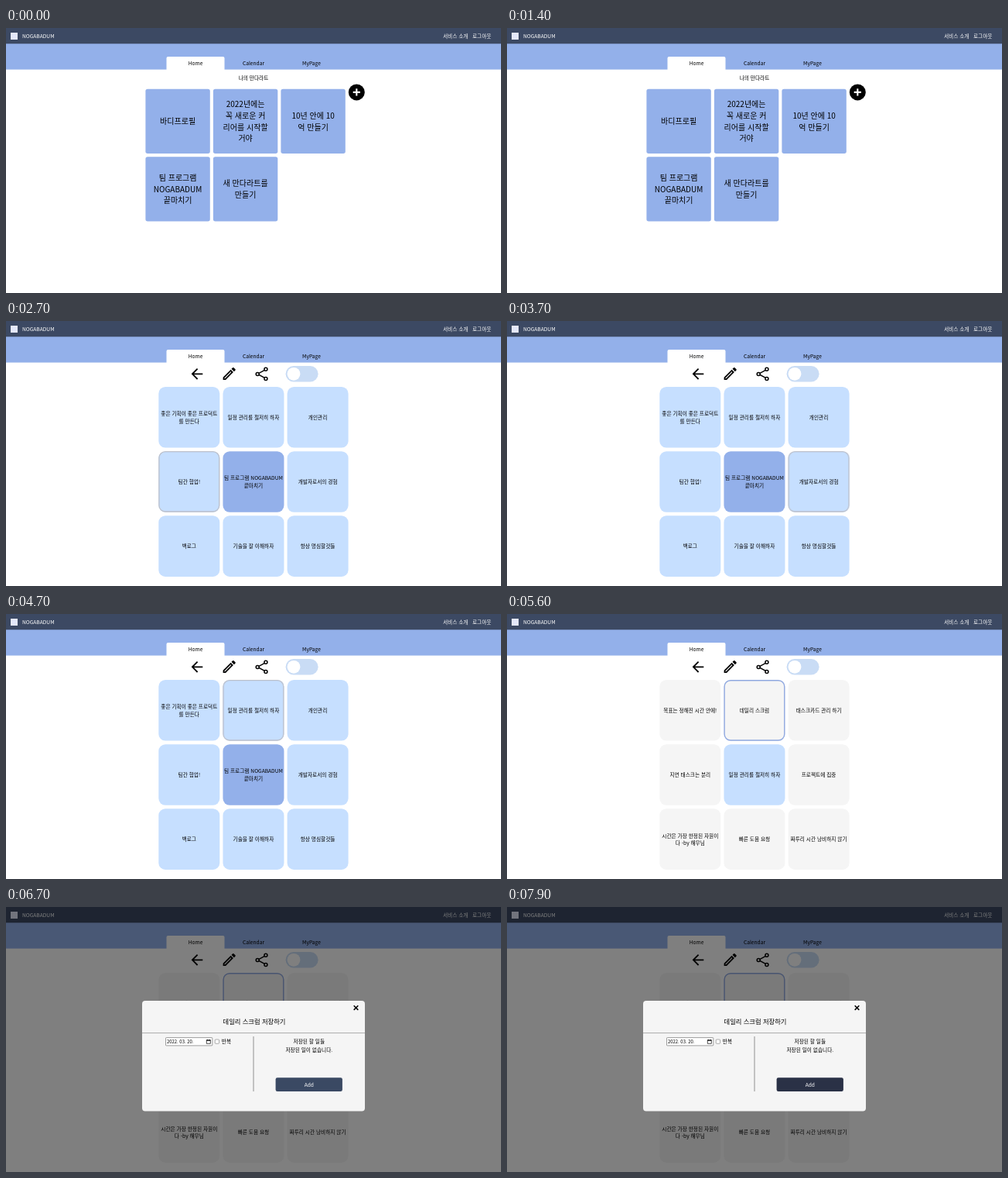
Recreate the animation shown at these times as an HTML page. Size 640 px wide and 342 px high, loop 8 s.

```html
<!DOCTYPE html>
<html lang="ko">
<head>
<meta charset="utf-8">
<title>Goal board</title>
<style>
html, body { margin: 0; width: 100%; height: 100%; overflow: hidden; background: #fff; }
svg { display: block; width: 100vw; height: 100vh; }
text { font-family: "Noto Sans CJK KR", "Noto Sans CJK", "Noto Sans", sans-serif; font-size: 6.667px; }
.mid { text-anchor: middle; }
.light { fill: #fff; }
.big text { font-size: 10px; }
.title { font-size: 8.3px; }
.line { fill: none; stroke: #000; }

.timed { animation: 8s step-end infinite; }
#home { animation-name: home; }
#grid { animation-name: grid; }
#sub { animation-name: sub; }
#subRing { animation-name: subRing; }
#modal { animation-name: modal; }
#loading { animation-name: loading; }
#loaded { animation-name: loaded; }
#close { animation-name: close; }
#ring { animation-name: ring; }
#add { fill: #3a4963; animation: add 8s linear infinite; }
.grow { transform-box: fill-box; transform-origin: center; animation: grow 8s linear infinite; }
#spin { transform-origin: 394.3px 190.5px; animation: spin 1s -.3s linear infinite; }

@keyframes home { 0% { opacity: 1 } 31%, to { opacity: 0 } }
@keyframes grid { 0% { opacity: 0 } 31% { opacity: 1 } 67.25%, to { opacity: 0 } }
@keyframes sub { 0% { opacity: 0 } 67.25%, to { opacity: 1 } }
@keyframes subRing { 0% { opacity: 0 } 68.5%, to { opacity: 1 } }
@keyframes modal { 0% { opacity: 0 } 71%, to { opacity: 1 } }
@keyframes loading { 0% { opacity: 1 } 77.25%, to { opacity: 0 } }
@keyframes loaded { 0% { opacity: 0 } 77.25%, to { opacity: 1 } }
@keyframes close { 0% { opacity: 0 } 27.25%, to { opacity: 1 } }
@keyframes grow { 0%, 27.25% { transform: none } 29%, to { transform: scale(1.012) } }
@keyframes add { 0%, 94.75% { fill: #3a4963 } 97%, to { fill: #2a3146 } }
@keyframes spin { to { transform: rotate(360deg) } }
/* the highlight follows the pointer from cell to cell */
@keyframes ring {
  0% { transform: translate(0, 83px) }
  41% { transform: translate(83.1px, 83px) }
  44.75% { transform: translate(166.3px, 83px) }
  51% { transform: translate(166.3px, 166.2px) }
  53.5% { transform: translate(166.3px, 83px) }
  55% { transform: translate(166.3px, 0) }
  56.25%, to { transform: translate(83.1px, 0) }
}
</style>
</head>
<body>
<svg viewBox="0 0 640 342" preserveAspectRatio="none">
  <rect width="640" height="342" fill="#fff"/>
  <rect y="20" width="640" height="33.6" fill="#93b0ea"/>
  <rect width="640" height="20.3" fill="#3c4963"/>
  <rect x="6" y="6" width="9" height="9" fill="#e4e8fa"/>
  <text class="light" x="21" y="12.9">NOGABADUM</text>
  <text class="light" x="565" y="12.9">서비스 소개</text>
  <text class="light" x="603" y="12.9">로그아웃</text>
  <path d="M207.5 54V39q0-2 2-2h71q2 0 2 2v15z" fill="#fff"/>
  <g class="mid">
    <text x="245" y="48.2">Home</text>
    <text x="320" y="48.2">Calendar</text>
    <text x="395" y="48.2">MyPage</text>
  </g>

  <g id="home" class="timed">
    <text class="mid" x="320" y="67">나의 만다라트</text>
    <g id="boards" class="big mid"></g>
    <path id="close" class="line timed" stroke-width="1.2" d="M257.6 167.5l4.8 4.8m0-4.8l-4.8 4.8"/>
    <circle cx="453.3" cy="82.9" r="10.5"/>
    <path class="line" style="stroke:#fff" stroke-width="2.1" d="M448.7 82.9h9.2m-4.6-4.6v9.2"/>
  </g>

  <g id="grid" class="timed">
    <g id="gridCells" class="mid"></g>
    <rect id="ring" class="timed" x="197.9" y="85.6" width="77.8" height="77.4" rx="8" fill="none" stroke="#bcc0cb" stroke-width="1.3"/>
  </g>

  <g id="sub" class="timed">
    <g id="subCells" class="mid"></g>
    <rect id="subRing" class="timed" x="281.1" y="85.7" width="77.7" height="77.3" rx="8" fill="none" stroke="#8fa8e0" stroke-width="1.4"/>
  </g>

  <g id="tools"></g>

  <g id="modal" class="timed">
    <rect width="640" height="342" fill="#000" opacity=".5"/>
    <rect x="176" y="121" width="288" height="142.5" rx="4" fill="#f5f5f5"/>
    <path class="line" stroke-width="1.5" d="M449.7 127.3l5.6 5.6m0-5.6l-5.6 5.6"/>
    <text class="title mid" x="321" y="151.4">데일리 스크럼 저장하기</text>
    <path d="M176 162.6h288" stroke="#999" stroke-width=".8"/>
    <rect x="206.5" y="168.6" width="60.3" height="10.3" rx=".8" fill="#fff" stroke="#767676" stroke-width=".7"/>
    <text x="208" y="176" style="font-size:5.9px">2022. 03. 20.</text>
    <path class="line" stroke-width=".7" d="M259.3 171.6h5v4.7h-5zm0 .9h5m-4-1.7v1m3-1v1"/>
    <rect x="270.2" y="171" width="5.3" height="5.3" rx=".9" fill="#fff" stroke="#767676" stroke-width=".6"/>
    <text x="278.8" y="176.2">반복</text>
    <text class="mid" x="391.8" y="176.2">저장된 할 일들</text>
    <g id="loading" class="timed">
      <path d="M320 167v82" stroke="#777" stroke-width=".8"/>
      <path id="spin" d="M392.6 184.7a6 6 0 0 1 5.6 10.4" fill="none" stroke="#93b0ea" stroke-width="2"/>
      <rect x="348.6" y="231.3" width="86.3" height="20.5" rx="2.3" fill="#3a4963"/>
      <text class="light mid" x="391.8" y="244">Add</text>
    </g>
    <g id="loaded" class="timed">
      <path d="M320 167v71" stroke="#777" stroke-width=".8"/>
      <text class="mid" x="391.8" y="187.3">저장된 일이 없습니다.</text>
      <rect id="add" x="348.6" y="220.2" width="86.3" height="17.8" rx="2.3"/>
      <text class="light mid" x="391.8" y="231.6">Add</text>
    </g>
  </g>
</svg>
<script>
const byId = id => document.getElementById(id);

// Fills a group with a three-column board; "|" separates lines of a label.
function board(id, labels, o) {
  byId(id).innerHTML = labels.map((label, i) => {
    const x = o.x + (i % 3) * o.step;
    const y = o.y + Math.floor(i / 3) * o.step;
    const lines = label.split('|');
    const text = lines.map((line, n) => {
      const mid = y + o.h / 2 + (n - (lines.length - 1) / 2) * o.lead;
      return `<text x="${x + o.w / 2}" y="${mid + o.drop}">${line}</text>`;
    }).join('');
    const cls = i === o.grow ? 'class="grow"' : '';
    const fill = i === 4 ? o.centre : o.fill;
    return `<rect ${cls} x="${x}" y="${y}" width="${o.w}" height="${o.h}" rx="${o.r}" fill="${fill}"/>${text}`;
  }).join('');
}

board('boards', [
  '바디프로필',
  '2022년에는|꼭 새로운 커|리어를 시작할|거야',
  '10년 안에 10|억 만들기',
  '팀 프로그램|NOGABADUM|끝마치기',
  '새 만다라트를|만들기'
], { x: 180.4, y: 78.7, step: 87.5, w: 83.4, h: 83.2, r: 2.7, lead: 14.6, drop: 3.9,
     fill: '#93b0ea', centre: '#93b0ea', grow: 3 });

const cells = { x: 197.3, y: 85, step: 83.15, w: 79, h: 78.6, r: 8.7, lead: 9.6, drop: 2.7 };

board('gridCells', [
  '좋은 기획이 좋은 프로덕트|를 만든다', '일정 관리를 철저히 하자', '개인관리',
  '팀간 협업!', '팀 프로그램 NOGABADUM|끝마치기', '개발자로서의 경험',
  '백로그', '기술을 잘 이해하자', '항상 명심할것들'
], { ...cells, fill: '#c6dfff', centre: '#93b0ea' });

board('subCells', [
  '목표는 정해진 시간 안에!', '데일리 스크럼', '태스크카드 관리 하기',
  '지연 태스크는 분리', '일정 관리를 철저히 하자', '프로젝트에 집중',
  '시간은 가장 한정된 자원이|다 -by 해무님', '빠른 도움 요청', '짜투리 시간 낭비하지 않기'
], { ...cells, fill: '#f5f5f5', centre: '#c6dfff' });

// The same toolbar sits above both cell boards.
const tools = `
  <path class="line" stroke-width="1.8" d="M254.3 68.3H241.4M247.6 61.6l-6.7 6.7 6.7 6.7"/>
  <g transform="translate(288.7 68) scale(.9)">
    <path d="M-9 9V5.2L2.1-5.8 5.8-2.1-5.2 9zM3.1-6.9L5-8.7q.7-.6 1.4 0L8.7-6.4q.6.7 0 1.4L6.9-3.1z"/>
    <path d="M-7 7v-.9L2.1-3l.9.9L-6.1 7z" fill="#fff"/>
  </g>
  <path class="line" stroke-width="1.5" d="M335.8 62.6l-10.6 5.8 10.6 5.8"/>
  <g fill="#fff" stroke="#000" stroke-width="1.5">
    <circle cx="335.9" cy="62.3" r="2"/>
    <circle cx="325.2" cy="68.4" r="2"/>
    <circle cx="335.9" cy="74.5" r="2"/>
  </g>
  <rect x="361.6" y="58" width="42" height="20.6" rx="10.3" fill="#c9dcf5"/>
  <circle cx="372" cy="68.3" r="8.4" fill="#fff"/>`;
for (const id of ['grid', 'sub']) byId(id).insertAdjacentHTML('beforeend', tools);
byId('tools').remove();
</script>
</body>
</html>
```
